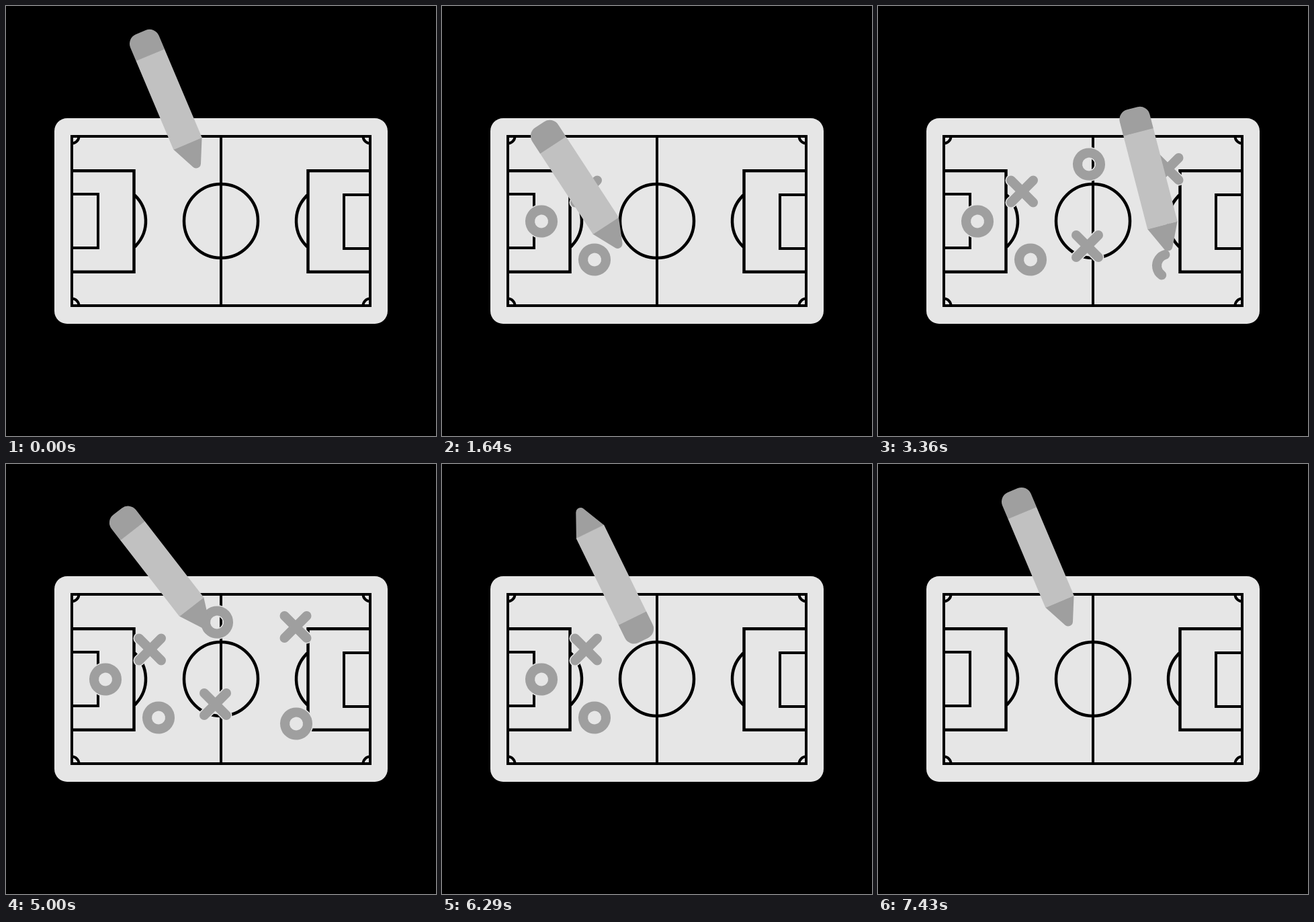
Write an HTML page with a canvas that moves like this. It is 640 px wide and 640 px high and loops after 8.43 s.

```html
<!DOCTYPE html>
<html lang="en">
<head>
<meta charset="utf-8">
<title>Tactics board</title>
<style>
  html, body { margin: 0; width: 100%; height: 100%; overflow: hidden; background: #000; }
  canvas { display: block; }
</style>
</head>
<body>
<canvas id="stage" width="640" height="640"></canvas>
<script>
const ctx = document.getElementById('stage').getContext('2d');
const LOOP = 8430, ERASE_AT = 5000, STEP = 1000 / 14;
const BOARD = '#e6e6e6', DARK = '#9f9f9f', LIGHT = '#c1c1c1';
const RAD = Math.PI / 180, TURN = 2 * Math.PI;

// Times are in steps of 1/14 s; tilt is the pen angle while the mark is drawn
const marks = [
  { type: 'o', x: 148, y: 320.5, start: 6.5, tilt: 32 },
  { type: 'o', x: 227, y: 377.5, start: 13.5, tilt: 34 },
  { type: 'x', x: 214.5, y: 276, start: 17.8, tilt: 33 },
  { type: 'x', x: 311.5, y: 357.5, start: 24.5, tilt: 33 },
  { type: 'o', x: 314, y: 235.5, start: 31, tilt: 32 },
  { type: 'x', x: 431, y: 242.5, start: 37.85, tilt: 29 },
  { type: 'o', x: 432, y: 386.5, start: 45.74, tilt: 14.5 }
];
const eraseOrder = [5, 6, 3, 4, 2, 1, 0];
const DRAW_TIME = 3.5, WIPE_TIME = 1.5, FIRST_WIPE = 6.7, WIPE_GAP = 3.1;

const RING = 17, RING_START = 125 * RAD;
const ARM = 16.5, FIRST_ARM = 0.4, SECOND_ARM = 0.6;
const TIP_TO_CAP = 192.5;

const clamp = v => Math.max(0, Math.min(1, v));
const mix = (a, b, p) => a + (b - a) * p;
const ease = p => p * p * (3 - 2 * p);
const progress = (from, length, t) => clamp((t - from) / length);

// A pen stop lasts from one time to another; pose(p) gives [x, y, angle]
const hold = (time, ...pose) => ({ from: time, to: time, pose: () => pose });

function drawingStop(m) {
  const pose = p => {
    if (m.type === 'o') {
      const a = RING_START + p * TURN;
      return [m.x + RING * Math.cos(a) + 4, m.y + RING * Math.sin(a) - 12.5, m.tilt];
    }
    const second = progress(SECOND_ARM, 1 - SECOND_ARM, p);
    const lift = progress(FIRST_ARM, SECOND_ARM - FIRST_ARM, p);
    const first = progress(0, FIRST_ARM, p);
    const across = first - second, down = first - lift + second;
    return [m.x - 3 + ARM * (2 * across - 1), m.y - 6 + ARM * (2 * down - 1), m.tilt];
  };
  return { from: m.start, to: m.start + DRAW_TIME, pose };
}

function wipingStop(m) {
  const pose = p => [
    m.x + 8 * Math.sin(p * TURN),
    m.y + 6 * Math.sin(p * TURN),
    233.6 - 0.0946 * m.x
  ];
  return { from: m.wipe, to: m.wipe + WIPE_TIME, pose };
}

eraseOrder.forEach((index, i) => marks[index].wipe = FIRST_WIPE + i * WIPE_GAP);

const drawStops = [
  hold(0, 283, 234.5, 22.9),
  ...marks.map(drawingStop),
  hold(23, 261.5, 354, 33.2),
  hold(53, 325, 240, 29),
  hold(56, 297, 238, 37.4)
].sort((a, b) => a.from - b.from);

const wipeStops = [
  hold(0, 178, 86, 37.8),
  hold(3, 265, 185, 125),
  ...eraseOrder.map(i => wipingStop(marks[i])),
  hold(30, 215, 175, 300),
  hold(34, 208.1, 57.2, 382.9)
];

function poseAt(stops, t) {
  const index = stops.findLastIndex(s => s.from <= t);
  const stop = stops[index], next = stops[index + 1];
  if (t < stop.to) return stop.pose(progress(stop.from, stop.to - stop.from, t));
  const a = stop.pose(1);
  if (!next) return a;
  const b = next.pose(0), p = ease(progress(stop.to, next.from - stop.to, t));
  return a.map((v, i) => mix(v, b[i], p));
}

function line(...points) {
  ctx.beginPath();
  for (let i = 0; i < points.length; i += 2) ctx.lineTo(points[i], points[i + 1]);
  ctx.stroke();
}

function arc(x, y, r, from, to) {
  ctx.beginPath();
  ctx.arc(x, y, r, from, to);
  ctx.stroke();
}

// One half of the pitch, seen from its goal line; side is -1 or 1
function drawHalf(side, goalTop) {
  const x = fromCentre => 320 + side * fromCentre;
  const middle = side < 0 ? 0 : Math.PI, spread = 47 * RAD;
  ctx.lineWidth = 4.5;
  line(x(222), 245.2, x(129.5), 245.2, x(129.5), 395.8, x(222), 395.8);
  arc(x(165), 320, 53, middle - spread, middle + spread);
  ctx.lineWidth = 4;
  line(x(222), goalTop, x(183), goalTop, x(183), goalTop + 80, x(222), goalTop + 80);
}

function drawBoard() {
  ctx.fillStyle = '#000';
  ctx.fillRect(0, 0, 640, 640);
  ctx.fillStyle = BOARD;
  ctx.beginPath();
  ctx.roundRect(72, 167, 496, 306, 19);
  ctx.fill();

  ctx.strokeStyle = '#000';
  ctx.lineCap = 'butt';
  drawHalf(-1, 280);
  drawHalf(1, 281);
  ctx.strokeRect(98, 194, 444, 252);
  line(320, 194, 320, 446);
  [[98, 194], [542, 194], [542, 446], [98, 446]].forEach(([x, y], i) =>
    arc(x, y, 10.5, i * TURN / 4, (i + 1) * TURN / 4));
  ctx.lineWidth = 4.5;
  arc(320, 320, 55, 0, TURN);
}

function strokeMark({ type, x, y }, p) {
  if (type === 'o') {
    arc(x, y, RING, RING_START, RING_START + p * TURN);
    return;
  }
  const arm = (side, q) => line(x - side * ARM, y - ARM,
    x + side * ARM * (2 * q - 1), y + ARM * (2 * q - 1));
  arm(1, progress(0, FIRST_ARM, p));
  if (p > SECOND_ARM) arm(-1, progress(SECOND_ARM, 1 - SECOND_ARM, p));
}

// Marks keep a thin clear rim against the pitch lines
function drawMark(mark, p) {
  if (p <= 0) return;
  ctx.lineCap = 'round';
  for (const [color, width] of [[BOARD, 17], [DARK, 14]]) {
    ctx.strokeStyle = color;
    ctx.lineWidth = width;
    strokeMark(mark, p);
  }
}

// The pen points down its own y axis, with the centre of its rounded tip at 0,0
function drawPen([x, y, angle], anchorY) {
  ctx.save();
  ctx.translate(x, y);
  ctx.rotate(-angle * RAD);
  ctx.translate(0, -anchorY);
  ctx.fillStyle = DARK;
  ctx.beginPath();
  ctx.roundRect(-23, -212, 46, 37, [15, 15, 0, 0]);
  ctx.fill();
  ctx.beginPath();
  ctx.moveTo(-23, -32.5);
  ctx.lineTo(23, -32.5);
  ctx.arc(0, 0, 7, 0.46, Math.PI - 0.46);
  ctx.fill();
  ctx.fillStyle = LIGHT;
  ctx.fillRect(-23, -175.5, 46, 143.5);
  ctx.restore();
}

function render(now) {
  const time = now % LOOP;
  const wiping = time >= ERASE_AT;
  const step = Math.floor((time - (wiping ? ERASE_AT : 0) + 5) / STEP);
  drawBoard();
  for (const m of marks) {
    drawMark(m, wiping
      ? 1 - progress(m.wipe, WIPE_TIME / 2, step)
      : progress(m.start, DRAW_TIME, step));
  }
  if (wiping) drawPen(poseAt(wipeStops, step), -TIP_TO_CAP);
  else drawPen(poseAt(drawStops, step), 0);
}

const start = performance.now();
function tick() {
  render(performance.now() - start);
  requestAnimationFrame(tick);
}
tick();
</script>
</body>
</html>
```
